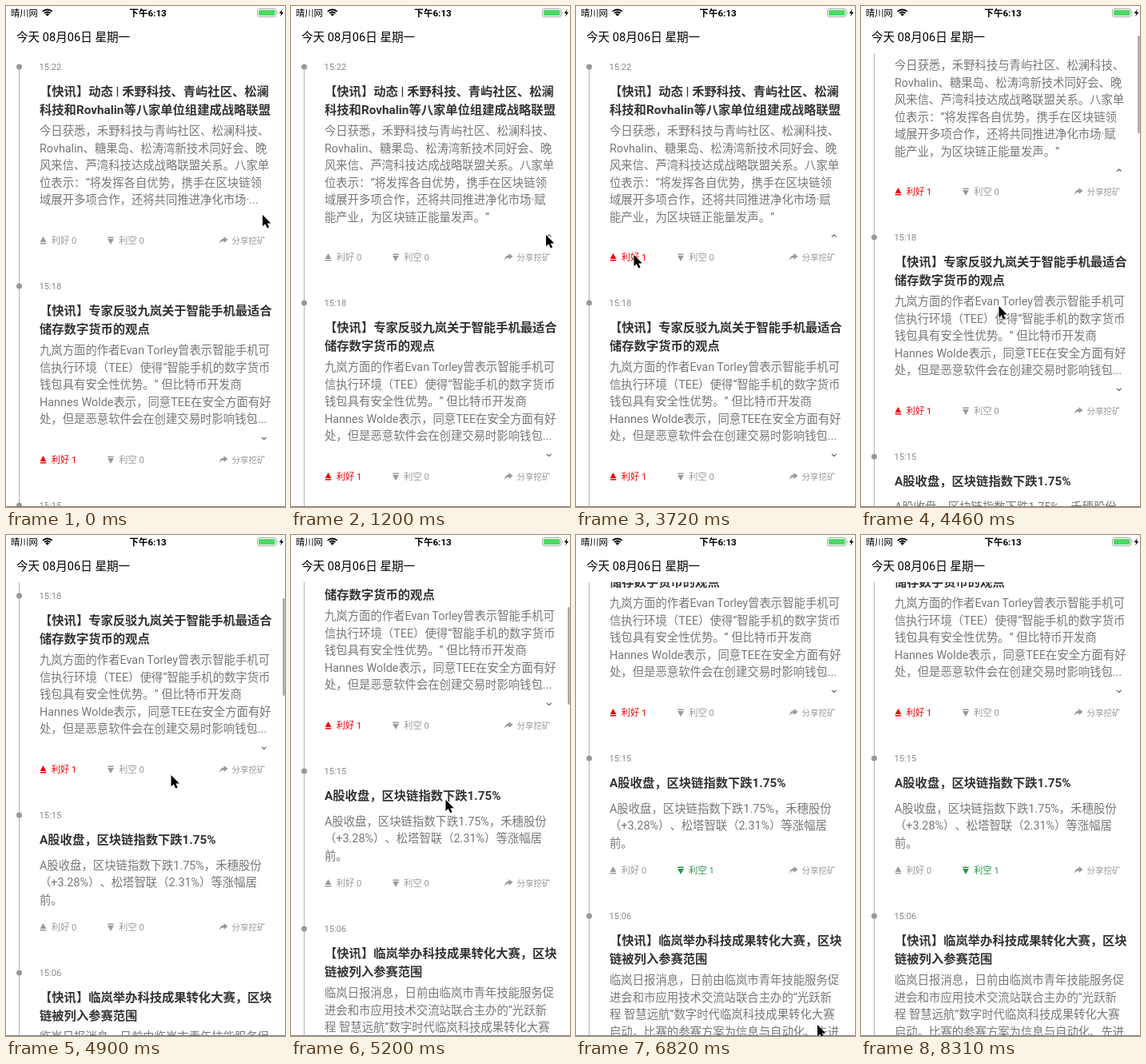
An HTML page for the animation above (8560 ms loop, 349 by 626 pixels).

```html
<!DOCTYPE html>
<html lang="zh-CN">
<head>
<meta charset="utf-8">
<title>快讯</title>
<style>
  html, body { margin: 0; width: 100%; height: 100%; overflow: hidden; background: #fff; }
  svg { display: block; width: 100%; height: 100%; }
  text {
    font-family: Roboto, "Noto Sans CJK SC", "Noto Sans CJK", sans-serif;
    text-spacing-trim: space-all;
    white-space: pre;
  }
  .status { font-size: 11.3px; }
  .clock { font-size: 11.6px; font-weight: 700; text-anchor: middle; }
  .date { font-size: 14.6px; }
  .time { font-size: 11.2px; fill: #888; }
  .title { font-size: 15.3px; font-weight: 700; fill: #333; }
  .body { font-size: 14.36px; fill: #777; }
  .act { font-size: 11.2px; fill: #999; }
  .share { font-size: 10.5px; }
  .up { fill: #f00000; }
  .down { fill: #2b9348; }
  .chev { fill: none; stroke: #555; stroke-width: 1.1; }
</style>
</head>
<body>
<svg id="stage" viewBox="0 0 349 626" preserveAspectRatio="none"></svg>
<script>
const LOOP = 8560;
const LINE = 21.5;
const GROW = 21;

const items = [
  { y: 76, time: '15:22', bodyY: 80, footY: 217, more: true,
    title: ['【快讯】动态 | 禾野科技、青屿社区、松澜', '科技和Rovhalin等八家单位组建成战略联盟'],
    body: ['今日获悉，禾野科技与青屿社区、松澜科技、',
      'Rovhalin、糖果岛、松涛湾新技术同好会、晚',
      '风来信、芦湾科技达成战略联盟关系。八家单',
      '位表示：“将发挥各自优势，携手在区块链领',
      '域展开多项合作，还将共同推进净化市场·...',
      '能产业，为区块链正能量发声。”'] },
  { y: 350, time: '15:18', bodyY: 80, footY: 217, more: true, liked: true,
    title: ['【快讯】专家反驳九岚关于智能手机最适合', '储存数字货币的观点'],
    body: ['九岚方面的作者Evan Torley曾表示智能手机可',
      '信执行环境（TEE）使得“智能手机的数字货币',
      '钱包具有安全性优势。” 但比特币开发商',
      'Hannes Wolde表示，同意TEE在安全方面有好',
      '处，但是恶意软件会在创建交易时影响钱包...'] },
  { y: 624, time: '15:15', bodyY: 62.5, footY: 140,
    title: ['A股收盘，区块链指数下跌1.75%'],
    body: ['A股收盘，区块链指数下跌1.75%，禾穗股份',
      '（+3.28%）、松塔智联（2.31%）等涨幅居',
      '前。'] },
  { y: 821, time: '15:06', bodyY: 80, footY: 217,
    title: ['【快讯】临岚举办科技成果转化大赛，区块', '链被列入参赛范围'],
    body: ['临岚日报消息，日前由临岚市青年技能服务促',
      '进会和市应用技术交流站联合主办的“光跃新',
      '程 智慧远航”数字时代临岚科技成果转化大赛',
      '启动。比赛的参赛方案为信息与自动化、先进'] }
];

// Moments at which the picture is refreshed
const ticks = [0, 600, 750, 900, 1200, 1500, 2240, 2690, 2840, 2990, 3130, 3280,
  3580, 3730, 3880, 4030, 4180, 4320, 4460, 4600, 4750, 4900, 5050, 5200, 5340,
  5490, 5630, 5780, 6080, 6230, 6380, 6520, 6670, 6820, 6960];

// Tracks of [time, value, ...]
const pointer = [[600, 321, 261], [900, 320, 291], [1200, 319, 286], [1499, 319, 286],
  [1500, 320, 263], [2600, 320, 263], [3280, 72.5, 311], [3580, 72.5, 311],
  [4180, 178, 457], [4320, 175, 401], [4460, 172.5, 375], [4750, 204, 308],
  [4900, 206.5, 300], [5050, 206, 301], [5630, 157.5, 416], [6080, 157.5, 416],
  [6820, 302, 612], [6960, 315, 645]];
const scroll = [[4180, 0], [4320, 56], [4460, 82], [4600, 195], [4750, 256], [4900, 295],
  [5050, 328], [5200, 350], [5340, 361], [5490, 366]];
const barFade = [[4180, 0], [4320, 1], [5340, 1], [5630, 0]];

const text = (cls, x, y, s) => `<text class="${cls}" x="${x}" y="${y}">${s}</text>`;
const lines = (cls, y, step, list) =>
  list.map((s, i) => text(cls, 42, y + i * step, s)).join('');
const arc = r => {
  const d = r * Math.SQRT1_2;
  return `<path d="M${-d} ${-d}A${r} ${r} 0 0 1 ${d} ${-d}"/>`;
};
const chevron = up => up ? 'M320 1.5l2.8-2.6 2.8 2.6' : 'M320-1.2l2.8 2.6 2.8-2.6';

function vote(id, x, label, count, cls, flip) {
  return `<g id="${id}" class="act ${cls}">
    <path transform="translate(${x} 0) scale(1 ${flip ? -1 : 1})"
      d="M0-5L3.9 2H-3.9zM-3.7 3h7.4v1.5h-7.4z"/>
    ${text('', x + 10.3, 4.2, `${label} ${count}`)}</g>`;
}

function entry(it, i) {
  const foot = `<g id="foot${i}" transform="translate(0 ${it.footY})">
    ${it.more ? `<path id="chev${i}" class="chev" transform="translate(0 -27)" d="${chevron(false)}"/>` : ''}
    ${vote('like' + i, 46.5, '利好', it.liked ? 1 : 0, it.liked ? 'up' : '', false)}
    ${vote('drop' + i, 131, '利空', 0, '', true)}
    <g class="act"><path transform="translate(267 -5)"
      d="M5.5 0L10.5 4 5.5 8V5.6C3 5.6 1.5 6.5 0 9 .2 5 2.5 2.6 5.5 2.4z"/>
    ${text('share', 282.4, 4, '分享挖矿')}</g></g>`;
  return `<g id="item${i}">
    <circle cx="16.5" cy="0" r="3.5" fill="#999"/>
    ${text('time', 41.5, 4, it.time)}
    ${lines('title', 36.3, 22.3, it.title)}
    <g id="body${i}">${lines('body', it.bodyY + 5.3, LINE, it.body)}</g>${foot}</g>`;
}

const stage = document.getElementById('stage');
stage.innerHTML = `
  <clipPath id="view"><rect y="59" width="349" height="567"/></clipPath>
  <rect width="349" height="626" fill="#fff"/>
  <g clip-path="url(#view)"><g id="feed">
    <path d="M16.5 76V1300" stroke="#b4b4b4"/>
    ${items.map(entry).join('')}
  </g></g>
  ${text('status', 6, 12.6, '晴川网')}
  <g transform="translate(51.8 12.8)" fill="none" stroke="#000" stroke-width="2">
    ${arc(8.4)}${arc(5.2)}<path d="M0 0L-2.3-2.3A3.2 3.2 0 0 1 2.3-2.3z" fill="#000" stroke="none"/></g>
  ${text('clock', 177.5, 12.8, '下午6:13')}
  <rect x="314.5" y="3.5" width="23.5" height="10" rx="2.4" fill="none" stroke="#a8a8a8"/>
  <rect x="316" y="5" width="20.5" height="7" rx="1.2" fill="#4cd964"/>
  <path d="M339.2 6.8q1.6 1.7 0 3.4z" fill="#a8a8a8"/>
  <path d="M345.6 3.8L341.8 9.2H344.3L343.2 13.2 347.2 7.7H344.6z"/>
  ${text('date', 13, 43.6, '今天 08月06日 星期一')}
  <rect id="bar" x="346.3" width="2.3" height="122" rx="1.1" fill="#000" fill-opacity=".38"/>
  <rect y="625" width="349" height="1" fill="#808080"/>
  <path id="arrow" d="M0 0V14.3L3.3 11.3 5.7 16.6 8.1 15.5 5.8 10.4H10.3z"
    stroke="#fff" stroke-width="1" paint-order="stroke"/>`;

const $ = id => document.getElementById(id);
const lastLine = $('body0').children[4];
const extraLine = $('body0').children[5];
const shortLine = items[0].body[4];
const fullLine = shortLine.replace('...', '赋');

function sample(track, t) {
  if (t <= track[0][0]) return track[0].slice(1);
  for (let i = 1; i < track.length; i++) {
    const a = track[i - 1], b = track[i];
    if (t <= b[0]) {
      const k = (t - a[0]) / (b[0] - a[0]);
      return a.slice(1).map((v, n) => v + (b[n + 1] - v) * k);
    }
  }
  return track[track.length - 1].slice(1);
}

const move = (id, x, y) => $(id).setAttribute('transform', `translate(${x} ${y})`);

function setVote(id, on, cls, label) {
  $(id).setAttribute('class', on ? 'act ' + cls : 'act');
  $(id).querySelector('text').textContent = `${label} ${on ? 1 : 0}`;
}

function draw(time) {
  const t = ticks.filter(v => v <= time).pop();
  const open = (t >= 600 && t < 1500) || t >= 2240;
  const grow = open ? GROW : 0;
  const [top] = sample(scroll, t);
  const [x, y] = sample(pointer, t);

  move('feed', 0, -top);
  items.forEach((it, i) => move('item' + i, 0, it.y + (i ? grow : 0)));
  move('foot0', 0, items[0].footY + grow);
  $('chev0').setAttribute('d', chevron(open));
  lastLine.textContent = open ? fullLine : shortLine;
  extraLine.style.display = open ? '' : 'none';

  setVote('like0', t >= 3580, 'up', '利好');
  setVote('drop2', t >= 6080, 'down', '利空');

  $('bar').setAttribute('y', 21 + top * 0.197);
  $('bar').setAttribute('opacity', sample(barFade, t)[0]);
  move('arrow', x, y);
}

const start = performance.now();
function loop() {
  draw((performance.now() - start) % LOOP);
  requestAnimationFrame(loop);
}
loop();
</script>
</body>
</html>
```
